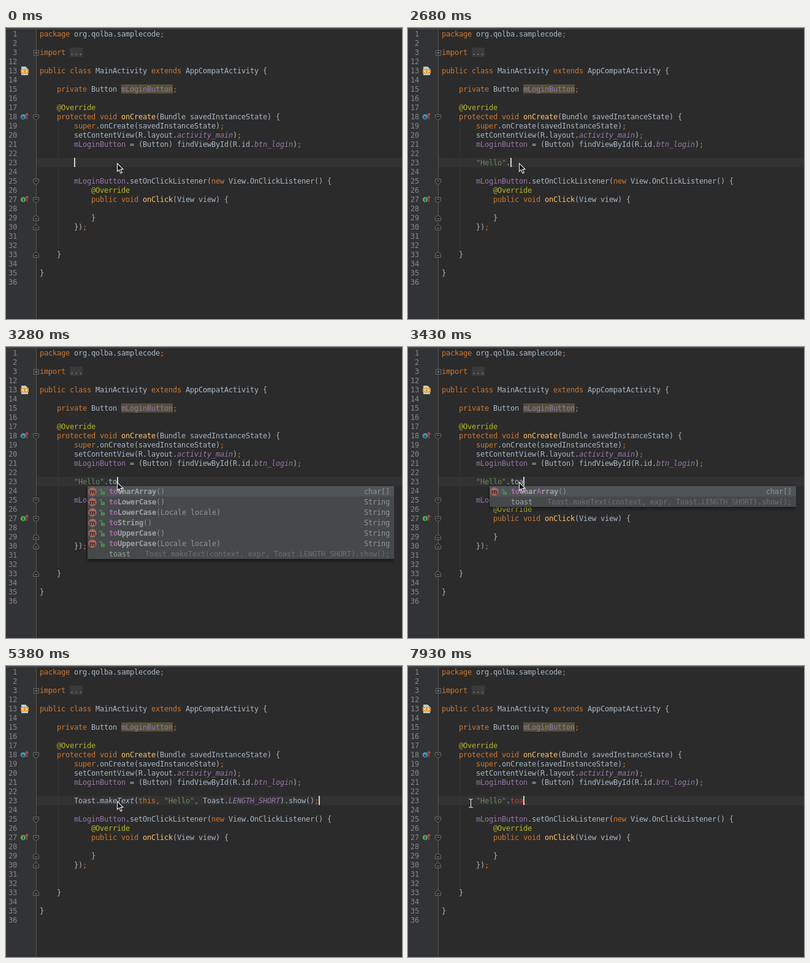
These frames come from a looping animation (646x475 px, 8 s). An HTML page with a canvas:

```html
<!DOCTYPE html>
<html lang="en">
<head>
<meta charset="utf-8">
<title>Code completion</title>
<style>
  html, body { margin: 0; width: 100%; height: 100%; overflow: hidden; background: #2b2b2b; }
  canvas { display: block; }
</style>
</head>
<body>
<canvas id="stage" width="646" height="475"></canvas>
<script>
const ctx = document.getElementById('stage').getContext('2d');
const LOOP = 8000, CELL = 7, ROW = 15, LEFT = 55, EDIT_X = 111, EDIT_Y = 212;
const MONO = '12px "DejaVu Sans Mono", "Liberation Mono", monospace';

// Styles: the first letter of each piece of marked-up code
const colors = {
  d: '#a9b7c6', k: '#cc7832', f: '#9876aa', i: '#9876aa', m: '#ffc66d',
  a: '#bbb529', s: '#6a8759', t: '#a9b7c6', e: '#bc3f3c', g: '#8c8c8c'
};

// line number: [indent, pieces]
const code = {
  1: [0, 'kpackage |dorg.qolba.samplecode|k;'],
  3: [0, 'kimport |g...'],
  13: [0, 'kpublic class |dMainActivity |kextends |dAppCompatActivity {'],
  15: [4, 'kprivate |dButton |fmLoginButton|k;'],
  17: [4, 'a@Override'],
  18: [4, 'kprotected void |monCreate|d(Bundle savedInstanceState) {'],
  19: [8, 'ksuper|d.onCreate(savedInstanceState)|k;'],
  20: [8, 'dsetContentView(R.layout.|iactivity_main|d)|k;'],
  21: [8, 'fmLoginButton|d = (Button) findViewById(R.id.|ibtn_login|d)|k;'],
  25: [8, 'fmLoginButton|d.setOnClickListener(|knew |dView.OnClickListener() {'],
  26: [12, 'a@Override'],
  27: [12, 'kpublic void |monClick|d(View view) {'],
  29: [12, 'd}'],
  30: [8, 'd})|k;'],
  33: [4, 'd}'],
  35: [0, 'd}']
};

// Completion items: name, parameters, type
const allMethods = [
  ['charAt', '(int index)', 'char'],
  ['codePointAt', '(int index)', 'int'],
  ['codePointBefore', '(int index)', 'int'],
  ['codePointCount', '(int start, int end)', 'int'],
  ['compareTo', '(String s)', 'int'],
  ['compareToIgnoreCase', '(String string)', 'int'],
  ['concat', '(String string)', 'String'],
  ['contains', '(CharSequence cs)', 'boolean'],
  ['contentEquals', '(CharSequence cs)', 'boolean'],
  ['contentEquals', '(StringBuffer sb)', 'boolean'],
  ['endsWith', '(String suffix)', 'boolean']
];
const toMethods = [
  ['toCharArray', '()', 'char[]'],
  ['toLowerCase', '()', 'String'],
  ['toLowerCase', '(Locale locale)', 'String'],
  ['toString', '()', 'String'],
  ['toUpperCase', '()', 'String'],
  ['toUpperCase', '(Locale locale)', 'String']
];
const toast = ['toast', '', 'Toast.makeText(context, expr, Toast.LENGTH_SHORT).show();'];

const hello = 's"Hello"|d.';
const call = (method, constant, end) =>
  `dToast.|${method}makeText|d(|kthis, |s"Hello"|k, |dToast.|${constant}LENGTH_SHORT|d).show()${end}`;

// Each step changes only what it names
const steps = [
  { at: 0, text: '', caret: 0, err: -1, list: null, query: '', sel: -1, braces: false, mouse: [181, 221, 'arrow'] },
  { at: 450, caret: -1 },
  { at: 600, text: 's""', caret: 1 },
  { at: 1040, err: 2 },
  ...[1340, 1640, 1790, 1940, 2240].map((at, n) =>
    ({ at, text: `s"${'Hello'.slice(0, n + 1)}"`, caret: n + 2, err: n + 3 })),
  { at: 2540, caret: 7 },
  { at: 2680, text: hello, caret: 8, err: 8 },
  { at: 2980, err: -1, list: allMethods },
  { at: 3130, text: hello + 't', caret: 9, query: 't', list: [...toMethods, ['trim', '()', 'String'], toast] },
  { at: 3280, text: hello + 'to', caret: 10, query: 'to', list: [...toMethods, toast] },
  { at: 3430, text: hello + 'toa', caret: 11, query: 'toa', list: [toMethods[0], toast] },
  { at: 4030, caret: -1 },
  { at: 4330, caret: 11, sel: 0 },
  { at: 4480, sel: 1 },
  { at: 4630, list: null },
  { at: 4780, text: call('d', 'd', '|k;'), caret: 57, err: 57 },
  { at: 5380, text: call('t', 'i', '|k;'), err: -1 },
  { at: 6580, text: call('t', 'i', ''), caret: 56, braces: true },
  { at: 7030, text: hello + 'toa', caret: 11, braces: false },
  { at: 7330, text: hello + '|etoa', err: 11 },
  { at: 7480, mouse: [136, 222, 'beam'] },
  { at: 7630, mouse: [66, 219, 'beam'] },
  { at: 7780, mouse: [20, 218, 'arrow'] },
  { at: 7930, mouse: [102, 224, 'beam'] }
];

const rowTop = line => 2 + ROW * (line < 4 ? line - 1 : line - 9);

function rect(x, y, w, h, color) {
  ctx.fillStyle = color;
  ctx.fillRect(x, y, w, h);
}

function shape(points, fill, stroke, width = 1, closed = true) {
  ctx.beginPath();
  points.forEach(([x, y]) => ctx.lineTo(x, y));
  if (closed) ctx.closePath();
  if (fill) { ctx.fillStyle = fill; ctx.fill(); }
  if (stroke) { ctx.strokeStyle = stroke; ctx.lineWidth = width; ctx.stroke(); }
}

const line = (points, color, width) => shape(points, null, color, width, false);

function disc(x, y, r, color) {
  ctx.fillStyle = color;
  ctx.beginPath();
  ctx.arc(x, y, r, 0, 7);
  ctx.fill();
}

// Monospaced text on the cell grid; returns the x after it
function type(text, x, base, color, face = '') {
  ctx.font = `${face} ${MONO}`;
  ctx.fillStyle = color;
  for (const ch of text) {
    ctx.fillText(ch, x, base);
    x += CELL;
  }
  return x;
}

function typeCode(markup, x, top) {
  for (const piece of markup.split('|')) {
    const style = piece[0];
    x = type(piece.slice(1), x, top + 12, colors[style], 'it'.includes(style) && style ? 'italic' : '');
  }
}

function foldMark(num, dir) {
  const y = rowTop(num) + 8.5, p = (x, dy) => [49 + x, y + dy * dir];
  shape([p(-4.5, -4), p(4.5, -4), p(4.5, 1.5), p(0, 5), p(-4.5, 1.5)], '#2b2b2b', '#6a6c6d');
  line([p(-2, -1), p(2, -1)], '#7c7e7f');
}

function overrideMark(num, color, letter) {
  const y = rowTop(num) + 8;
  disc(28, y, 4.3, color);
  ctx.font = 'bold 7px "DejaVu Sans", sans-serif';
  ctx.fillStyle = '#1f3038';
  ctx.textAlign = 'center';
  ctx.fillText(letter, 28, y + 2.5);
  ctx.textAlign = 'left';
  line([[34, y + 4], [34, y - 5]], '#c75450', 1.2);
  line([[31.5, y - 2.5], [34, y - 5.5], [36.5, y - 2.5]], '#c75450', 1.2);
}

function drawGutter() {
  rect(0, 0, 49, 475, '#313335');
  rect(49, 0, 1, 475, '#555555');
  rect(0, 0, 646, 1, '#3c3f41');
  rect(0, 1, 646, 1, '#4b4b4b');
  for (let n = 1; n <= 36; n++) {
    if (n > 3 && n < 12) continue;
    type(String(n), 18 - CELL * String(n).length, rowTop(n) + 12, '#888888');
  }
  ctx.lineWidth = 1;
  shape([[45.5, 36.5], [53.5, 36.5], [53.5, 44.5], [45.5, 44.5]], '#2b2b2b', '#6a6c6d');
  line([[47, 40.5], [52, 40.5]], '#7c7e7f');
  line([[49.5, 38], [49.5, 43]], '#7c7e7f');
  [18, 25, 27].forEach(n => foldMark(n, 1));
  [29, 30, 33].forEach(n => foldMark(n, -1));

  shape([[25, 63], [32, 63], [36, 67], [36, 77], [25, 77]], '#c4c8ca');
  rect(24, 67, 13, 7, '#e09a2c');
  line([[29, 68.5], [26.5, 70.5], [29, 72.5]], '#fff3dc', 1.2);
  line([[32, 68.5], [34.5, 70.5], [32, 72.5]], '#fff3dc', 1.2);
  overrideMark(18, '#4a9ac4', 'o');
  overrideMark(27, '#4fa65a', 'I');
}

function drawEditor(s) {
  rect(0, 0, 646, 475, '#2b2b2b');
  rect(50, EDIT_Y, 596, ROW, '#323232');
  drawGutter();
  rect(85, 152, 1, 210, '#373737');
  rect(104, 32, 21, ROW, '#3a3a3a');
  rect(188, 92, 84, ROW, '#52503a');
  for (const n in code) typeCode(code[n][1], LEFT + CELL * code[n][0], rowTop(+n));

  if (s.braces) rect(EDIT_X + 54 * CELL, EDIT_Y, 2 * CELL, ROW, '#3b514d');
  if (s.text) typeCode(s.text, EDIT_X, EDIT_Y);
  if (s.err >= 0) {
    const x = EDIT_X + s.err * CELL;
    line([0, 2, 4, 6].map((dx, n) => [x + dx + 0.5, n % 2 ? 224.5 : 226.5]), '#bc3f3c');
  }
  if (s.caret >= 0) rect(EDIT_X + s.caret * CELL, EDIT_Y, 2, ROW, '#d0d0d0');
}

function methodIcon(y, focused) {
  disc(141, y, 6.7, focused ? '#e88474' : '#a9675e');
  ctx.font = 'bold 10px "DejaVu Sans", sans-serif';
  ctx.fillStyle = focused ? '#5a2a24' : '#452a27';
  ctx.textAlign = 'center';
  ctx.fillText('m', 141, y + 3.5);
  ctx.textAlign = 'left';
  const green = focused ? '#5fb865' : '#518f56';
  ctx.strokeStyle = green;
  ctx.lineWidth = 1.3;
  ctx.beginPath();
  ctx.arc(154.5, y - 1.5, 2, Math.PI, 0);
  ctx.lineTo(156.5, y);
  ctx.stroke();
  rect(155, y, 6, 5, green);
  rect(157.5, y + 1.5, 1, 2, '#33403a');
}

function drawPopup({ list, query, sel }) {
  const x = 133, top = 227, w = 500, h = Math.min(list.length * 17, 179);
  const focused = sel >= 0, plain = focused ? '#bbbbbb' : '#a0a2a4';
  ctx.save();
  ctx.beginPath();
  ctx.rect(130, EDIT_Y, 503, 194);
  ctx.clip();
  ctx.shadowColor = 'rgba(0,0,0,.6)';
  ctx.shadowBlur = 7;
  ctx.shadowOffsetY = 2;
  rect(x, top, w, h, '#45494a');
  ctx.shadowColor = 'transparent';
  ctx.beginPath();
  ctx.rect(x, top, w, h);
  ctx.clip();

  list.forEach(([name, params, kind], n) => {
    const y = top + n * 17, base = y + 13, template = !params;
    if (n === sel) rect(x, y, w, 17, '#0052a4');
    else if (!n && !focused) rect(x, y, w, 17, '#505456');
    const color = n === sel ? '#e0e0e0' : plain;
    let tx = 168, hit = 0;
    [...name].forEach((ch, i) => {
      const match = !template && ch.toLowerCase() === query[hit] && (i === hit || ch < 'a');
      if (match) hit++;
      tx = type(ch, tx, base, match ? (focused ? '#d17ad6' : '#a968ad') : color, template ? '' : 'bold');
    });
    type(params, tx, base, n === sel ? color : focused ? '#b0b0b0' : '#929496');
    const dim = template ? '#6c6f70' : focused ? '#b0b0b0' : '#929496';
    type(kind, 626 - CELL * kind.length, base, n === sel ? color : dim);
    if (!template) methodIcon(y + 9, focused);
  });

  if (list === allMethods) {
    rect(625, 229, 6, 26, 'rgba(130,132,134,.65)');
    ctx.font = 'bold 14px "DejaVu Sans", sans-serif';
    ctx.fillStyle = '#3592c4';
    ctx.fillText('π', 622, 404);
  }
  ctx.restore();
}

function drawMouse([x, y, kind]) {
  ctx.save();
  ctx.translate(x, y);
  if (kind === 'arrow') {
    shape([[.5, 0], [.5, 13], [3.6, 10.4], [6, 16], [8.3, 15], [6, 9.6], [10, 9.4]], '#111111', '#f2f2f2', 1.1);
  } else {
    for (const [color, width] of [['#1c1c1c', 3], ['#f0f0f0', 1.2]]) {
      line([[-3, -7], [-1, -7], [.5, -5.5], [2, -7], [4, -7]], color, width);
      line([[.5, -5.5], [.5, 5.5]], color, width);
      line([[-3, 7], [-1, 7], [.5, 5.5], [2, 7], [4, 7]], color, width);
    }
  }
  ctx.restore();
}

function frame() {
  const t = performance.now() % LOOP;
  const state = Object.assign({}, ...steps.filter(step => step.at <= t));
  drawEditor(state);
  if (state.list) drawPopup(state);
  drawMouse(state.mouse);
  requestAnimationFrame(frame);
}
frame();
</script>
</body>
</html>
```
